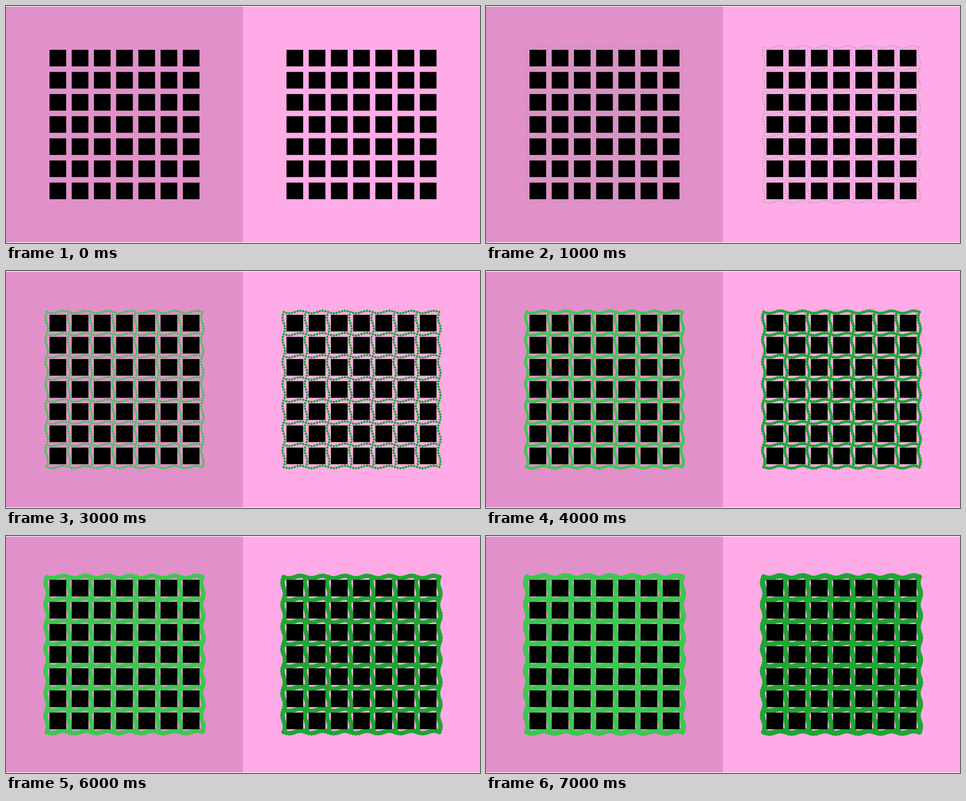
An HTML page with a canvas that plays this animation: 1056x530 px, repeating every 8000 ms.

```html
<!DOCTYPE html>
<html lang="en">
<head>
<meta charset="utf-8">
<title>Wavy dotted grids</title>
<style>
html, body { margin: 0; width: 100%; height: 100%; overflow: hidden; background: #fff; }
canvas { display: block; }
</style>
</head>
<body>
<canvas id="stage" width="1056" height="530"></canvas>
<script>
const ctx = document.getElementById('stage').getContext('2d');
const PITCH = 49.5, CELLS = 7, SIDE = PITCH * 0.75;
const WAVE = 2.8, DOTS_PER_CELL = 8, GROWTH = 0.88;
const START = 264 - PITCH * CELLS / 2;
const PANELS = [
  { x: 0, back: '#e190ca', dot: '#3cc850' },
  { x: 528, back: '#ffabe7', dot: '#1ea632' }
];

function dot(x, y, r) {
  ctx.moveTo(x + r, y);
  ctx.arc(x, y, r, 0, 2 * Math.PI);
}

function drawDots(r) {
  ctx.beginPath();
  for (let line = 0; line <= CELLS; line++) {
    const base = START + line * PITCH;
    for (let i = 0; i <= CELLS * DOTS_PER_CELL; i++) {
      const along = START + i * PITCH / DOTS_PER_CELL;
      const shift = WAVE * Math.sin(2 * Math.PI * i / DOTS_PER_CELL);
      dot(along, base + shift, r);
      dot(base - shift, along, r);
    }
  }
  ctx.fill();
}

function drawSquares() {
  const inset = (PITCH - SIDE) / 2;
  for (let row = 0; row < CELLS; row++)
    for (let col = 0; col < CELLS; col++)
      ctx.fillRect(START + col * PITCH + inset, START + row * PITCH + inset, SIDE, SIDE);
}

function draw(step) {
  ctx.clearRect(0, 0, 1056, 530);
  for (const p of PANELS) {
    ctx.save();
    ctx.translate(p.x, 1);
    ctx.fillStyle = p.back;
    ctx.fillRect(0, 0.3, 528, 527.4);
    ctx.fillStyle = p.dot;
    if (step) drawDots(step * GROWTH);
    ctx.fillStyle = '#000';
    drawSquares();
    ctx.restore();
  }
}

const begin = performance.now();
function tick() {
  draw(Math.floor((performance.now() - begin) / 1000) % 8);
  requestAnimationFrame(tick);
}
tick();
</script>
</body>
</html>
```
